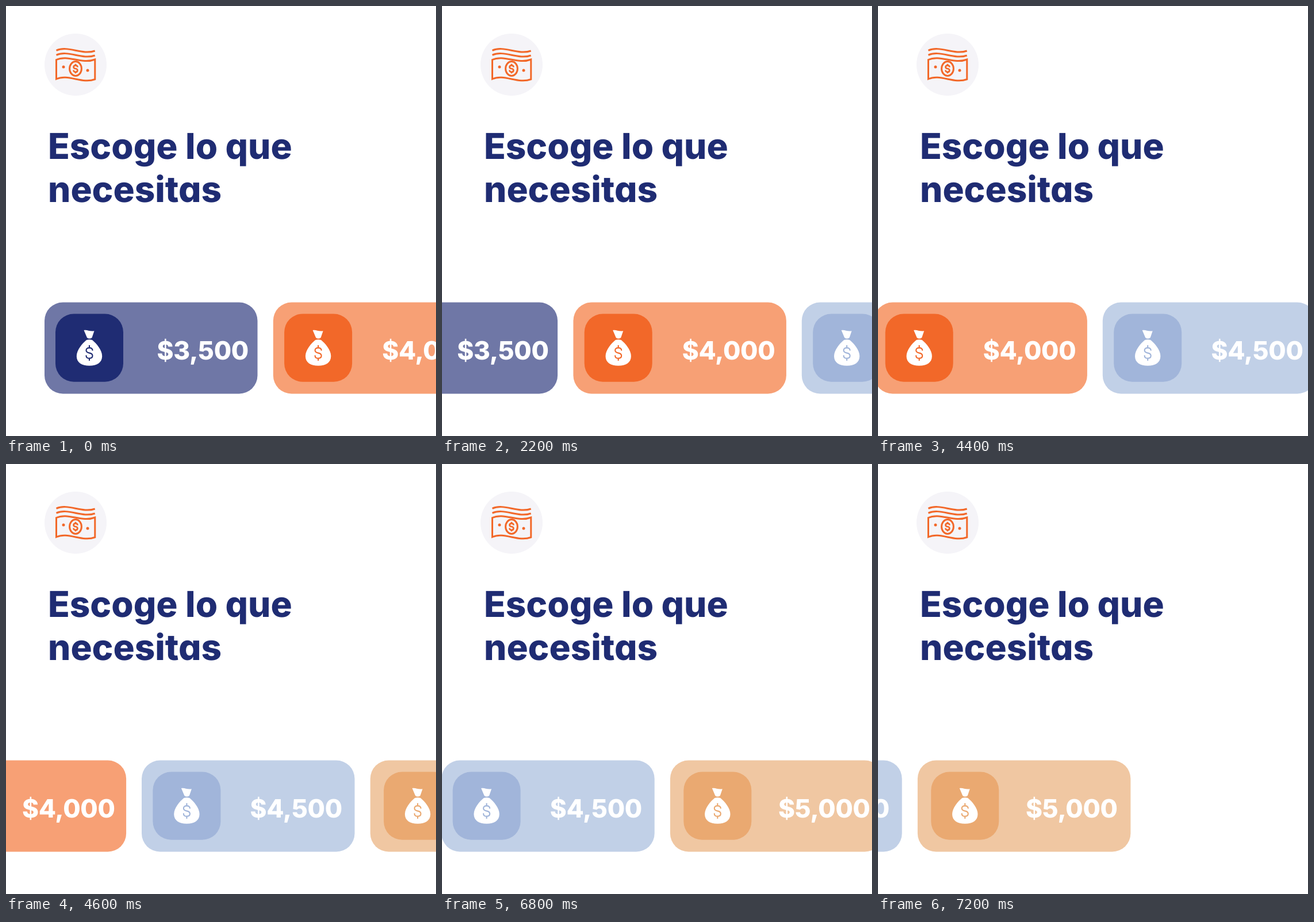
These frames come from a looping animation (748x748 px, 9200 ms). An HTML page:

```html
<!DOCTYPE html>
<html lang="es">
<head>
<meta charset="utf-8">
<title>Escoge lo que necesitas</title>
<style>
  html, body { margin: 0; width: 100%; height: 100%; overflow: hidden; background: #fff; }
  svg { display: block; width: 100vw; height: 100vh; }
  text { font-family: Poppins, Inter, sans-serif; font-weight: 800; font-feature-settings: "cv11"; text-rendering: geometricPrecision; }
  .title { font-size: 62px; fill: #1f2c73; }
  .price { font-size: 44px; fill: #fff; text-anchor: middle; letter-spacing: -.3px; }
  .line { fill: none; stroke: #f26829; stroke-width: 3; }
</style>
</head>
<body>
<svg viewBox="0 0 748 748">
  <defs>
    <path id="dollar" fill="none" d="M5.5 -4V-4.5Q5.5 -9 0 -9T-5.5 -4.5Q-5.5 -1 0 0T5.5 4.7Q5.5 9.3 0 9.3T-5.5 4.7V4M0 -13.5V-9M0 9.3V13.5"/>
    <g id="bag" fill="#fff">
      <path d="M-9.5 -30.5C-4 -32 0 -28 8.5 -29.3L4.5 -17.5Q0 -14.5 -4 -17.5Z"/>
      <path d="M-5 -13.6Q0 -15 5 -13.6C12 -8 22.2 4 22.2 14.5C22.2 26 13 31.2 0 31.2S-22.2 26 -22.2 14.5C-22.2 4 -12 -8 -5 -13.6Z"/>
    </g>
  </defs>

  <circle cx="121" cy="102" r="54" fill="#f5f4f8"/>
  <g class="line">
    <path d="M87.5 77.3C108 68 132 86 154.7 78M87.5 85.3C108 76 132 94 154.7 86"/>
    <path d="M87.5 93.5C108 84 132 102 154.8 93V127.5C132 136 108 117.5 87.5 127Z"/>
    <ellipse cx="121" cy="109" rx="10.4" ry="12.4"/>
    <use href="#dollar" transform="translate(121 109) scale(.62)" stroke-width="4.4"/>
  </g>
  <g fill="#f26829">
    <circle cx="100" cy="106" r="2.5"/>
    <circle cx="142" cy="112" r="2.5"/>
  </g>

  <text class="title" x="73" y="266">Escoge lo que</text>
  <text class="title" x="73" y="341">necesitas</text>
  <g id="track"></g>
</svg>
<script>
  const LOOP = 9200, HOLD = 2000, PERIOD = 2400, STEP = 100, STEPS = 5;
  const slides = [394, 387, 410];
  const cards = [
    { price: "$3,500", x: 67, back: "#6f77a6", front: "#1f2c73", icon: 19, label: 275.3 },
    { price: "$4,000", x: 464.8, back: "#f7a075", front: "#f26829", icon: 19.3, label: 270.2 },
    { price: "$4,500", x: 862.2, back: "#c1d0e7", front: "#a1b5da", icon: 19.4, label: 268.7 },
    { price: "$5,000", x: 1259.9, back: "#f0c7a2", front: "#eaa971", icon: 23.4, label: 268 },
  ];
  const track = document.getElementById("track");

  track.innerHTML = cards.map(c => `
    <g transform="translate(${c.x} 0)">
      <rect y="515.5" width="370.5" height="159" rx="32" fill="${c.back}"/>
      <rect x="${c.icon}" y="535.5" width="118" height="118.3" rx="32" fill="${c.front}"/>
      <g transform="translate(${c.icon + 59} 594.6)">
        <use href="#bag"/>
        <use href="#dollar" y="9" stroke="${c.front}" stroke-width="2.1"/>
      </g>
      <text class="price" x="${c.label}" y="615">${c.price}</text>
    </g>`).join("");

  // Each slide advances in equal hard steps.
  function offset(t) {
    return slides.reduce((sum, distance, i) => {
      const step = Math.floor((t - HOLD - i * PERIOD) / STEP) + 1;
      return sum + distance * Math.max(0, Math.min(STEPS, step)) / STEPS;
    }, 0);
  }

  function draw() {
    track.setAttribute("transform", `translate(${-offset(performance.now() % LOOP)} 0)`);
    requestAnimationFrame(draw);
  }
  draw();
</script>
</body>
</html>
```
